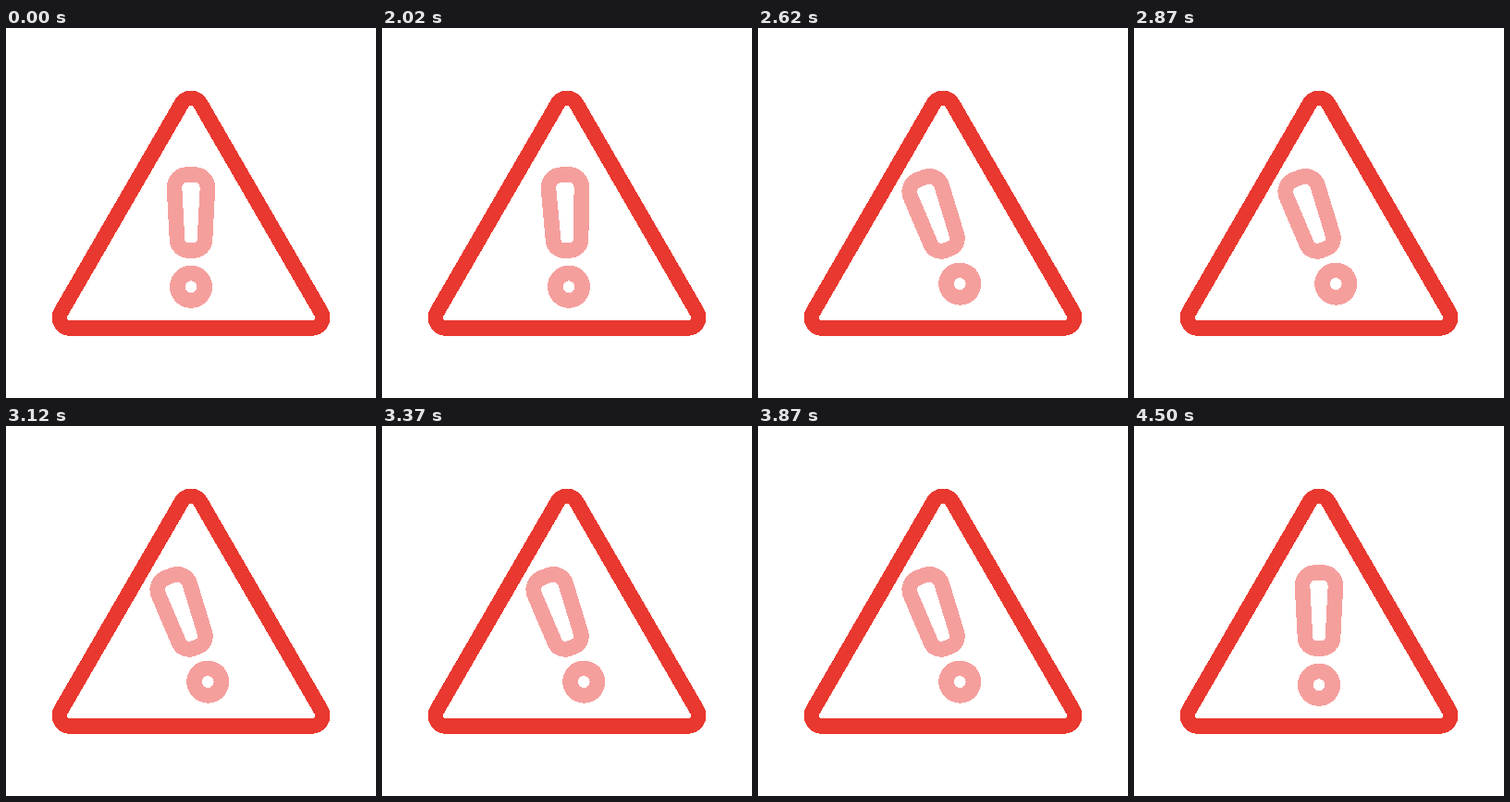
Write an HTML page that moves like this. It is 400 by 400 pixels and loops after 4520 ms.

```html
<!DOCTYPE html>
<html lang="en">
<head>
<meta charset="utf-8">
<title>Warning sign</title>
<style>
  html, body { margin: 0; width: 100%; height: 100%; overflow: hidden; background: #fff; }
  svg { display: block; width: 100vw; height: 100vh; shape-rendering: crispEdges; }
  .edge { stroke-linejoin: round; }
  .mark { fill: none; stroke: #f59f9d; stroke-width: 16.6; }
</style>
</head>
<body>
<svg viewBox="0 0 400 400">
  <path class="edge" d="M200 87.5L330.5 313H69.5Z" fill="#e9382f" stroke="#e9382f" stroke-width="39.8"/>
  <path class="edge" d="M200 87.5L330.5 313H69.5Z" fill="#fff" stroke="#fff" stroke-width="6.8"/>
  <g id="mark" class="mark">
    <path d="M182 172.5a14 14 0 0 1 14-14h8a14 14 0 0 1 14 14l-3 56a12 12 0 0 1-12 12h-6a12 12 0 0 1-12-12z"/>
    <circle cx="200" cy="279.8" r="14.7"/>
  </g>
</svg>
<script>
  const LOOP = 4520, REST = 2000, STEP = 25, STEPS = 100;
  const SWING = 30, FIRST = 16, LAST = 76, HALF = 5;
  const mark = document.getElementById('mark');

  // Lean left, shake at constant speed, then ease back upright.
  function angle(p) {
    if (p < FIRST) return -SWING * p / FIRST;
    if (p > LAST) return -SWING * (100 - p) / (100 - LAST);
    const phase = (p - FIRST) / HALF % 2;
    return SWING * (1 - 2 * Math.abs(1 - phase));
  }

  // The shake advances in 25 ms steps, rounded to hundredths of a second.
  function pose(t) {
    const k = Math.floor((t - REST + 5) / STEP);
    return k <= 0 || k >= STEPS ? 0 : angle(k + 1 / 6);
  }

  const start = performance.now();
  function draw() {
    const t = (performance.now() - start) % LOOP;
    mark.setAttribute('transform', `rotate(${pose(t)} 200 226.5)`);
    requestAnimationFrame(draw);
  }
  draw();
</script>
</body>
</html>
```
